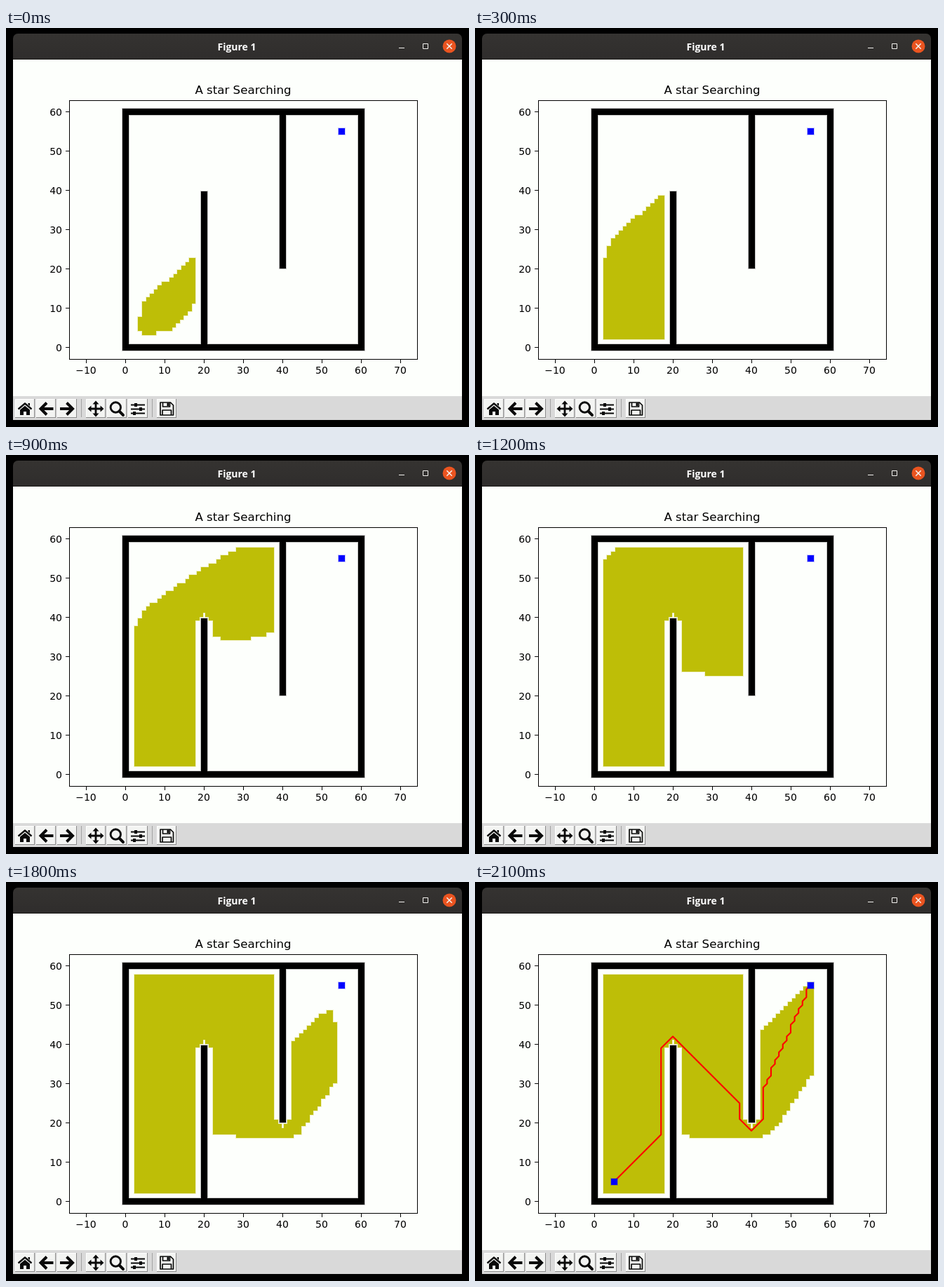
Animation of 660x569 px, one loop 2.4 s. Source, as an HTML page:

```html
<!DOCTYPE html>
<html lang="en">
<head>
<meta charset="utf-8">
<title>A star Searching</title>
<style>
  html, body { margin: 0; width: 100%; height: 100%; overflow: hidden; background: #000; }
  svg { display: block; width: 660px; height: 569px; }
  .plot { font-family: "DejaVu Sans", sans-serif; font-size: 14px; fill: #000; }
  .caption { font: bold 14px "Open Sans", sans-serif; fill: #fff; }
  .crisp { shape-rendering: crispEdges; }
  .cells { stroke-width: 2; stroke-opacity: .22; }
</style>
</head>
<body>
<svg viewBox="0 0 660 569" xmlns="http://www.w3.org/2000/svg">
  <defs>
    <linearGradient id="bar" x2="0" y2="1">
      <stop offset="0" stop-color="#353331"/>
      <stop offset="1" stop-color="#2f2d2c"/>
    </linearGradient>
  </defs>
  <rect width="660" height="569" fill="#000"/>

  <!-- window -->
  <path d="M10 45V15a7 7 0 0 1 7-7H643a7 7 0 0 1 7 7V45z" fill="url(#bar)"/>
  <rect x="10" y="44" width="640" height="1" fill="#191816"/>
  <text class="caption" x="329" y="32" text-anchor="middle">Figure 1</text>
  <g fill="none" stroke="#f4f3f0">
    <path d="M560 28.5h8M594.5 22.5h7v7h-7z"/>
    <circle cx="632" cy="26" r="9.5" fill="#ea5420" stroke="none"/>
    <path d="M628.3 22.3l7.4 7.4m0-7.4l-7.4 7.4" stroke-width="1.5"/>
  </g>
  <rect x="10" y="45" width="640" height="480" fill="#fdfffc"/>
  <rect x="10" y="525" width="640" height="34" fill="#d9d9d9"/>

  <!-- plot -->
  <path id="area" class="cells" fill="#bebe08" stroke="#bebe08"/>
  <path id="walls" class="cells" fill="#000" stroke="#000"/>
  <path id="route" fill="none" stroke="#f00" stroke-width="2.1" stroke-linejoin="round"/>
  <path id="start" class="cells" fill="#00f" stroke="#00f"/>
  <path id="goal" class="cells" fill="#00f" stroke="#00f"/>
  <rect x="90.5" y="103.5" width="496" height="369" fill="none" stroke="#000"/>
  <g id="axes" class="plot">
    <text x="338" y="94" font-size="16.67" text-anchor="middle">A star Searching</text>
  </g>

  <!-- toolbar -->
  <g id="buttons" class="crisp"></g>
  <path class="crisp" d="M107.5 529v26M208.5 529v26" stroke="#a3a3a3"/>
  <g fill="none" stroke="#0a0a0a" stroke-linejoin="round">
    <path d="M17.5 543.5l9.5-8 9.5 8" stroke-width="2.3"/>
    <path d="M20 544.5l7-5.8 7 5.8v7.5h-5v-5h-4v5h-5zM31.5 535h2.5v4l-2.5-2z" fill="#0a0a0a" stroke="none"/>
    <path d="M58 534.5l-8.5 8.5 8.5 8.5M50 543h17.5" stroke-width="4" stroke-linejoin="miter"/>
    <path d="M86.5 534.5l8.5 8.5-8.5 8.5M94.5 543H77" stroke-width="4" stroke-linejoin="miter"/>
    <path d="M128 535v16M120 543h16" stroke-width="2.8"/>
    <path d="M128 531.5l4.5 5h-9zM128 554.5l4.5-5h-9zM116.5 543l5-4.5v9zM139.5 543l-5-4.5v9z" fill="#0a0a0a" stroke="none"/>
    <circle cx="156.3" cy="541" r="7.2" stroke-width="2.9"/>
    <path d="M161.5 546.5l5.5 5.5" stroke-width="4" stroke-linecap="round"/>
    <path d="M178 537.5h20M178 543.5h20M178 549.5h20" stroke-width="1.8"/>
    <path d="M183 535h4v5h-4zM190 541h4v5h-4zM181 547h4v5h-4z" fill="#0a0a0a" stroke="none"/>
    <path d="M220 534h14.5l4 4v14H220zM223.5 534v6h10v-6M223 552v-7h12.5v7" stroke-width="1.7"/>
    <path d="M229.5 534.5h3v4.5h-3z" fill="#0a0a0a" stroke="none"/>
  </g>
</svg>
<script>
const HOLD = 300, CELL = 5.6, SIZE = 9, N = 61, CLEARANCE = 2;
const START = [5, 5], GOAL = [55, 55];
// Rectangles of wall cells: x0, y0, x1, y1
const WALLS = [[0, 0, 60, 0], [0, 60, 60, 60], [0, 0, 0, 60], [60, 0, 60, 60],
  [20, 0, 20, 39], [40, 21, 40, 60]];
// Highest path estimate explored at each stage; the last is the route's own length
const LIMITS = [72.62, 79.7, 82.4, 88.45, 102, 117.12, 118.1, 118.72];

const el = id => document.getElementById(id);
const px = x => 170 + CELL * x;
const py = y => 455.5 - CELL * y;

// Block of square markers spanning grid cells, as a path
function block(x0, y0, x1 = x0, y1 = y0) {
  const l = Math.ceil(px(x0) - SIZE / 2), r = Math.ceil(px(x1) - SIZE / 2) + SIZE;
  const t = Math.ceil(py(y1) - SIZE / 2), b = Math.ceil(py(y0) - SIZE / 2) + SIZE;
  return `M${l} ${t}H${r}V${b}H${l}z`;
}

function isFree(x, y) {
  return WALLS.every(([x0, y0, x1, y1]) =>
    Math.hypot(Math.max(x0 - x, 0, x - x1), Math.max(y0 - y, 0, y - y1)) > CLEARANCE);
}

// Shortest eight-way distance from the start to every free cell
function distances() {
  const free = Array.from({ length: N * N }, (_, i) => isFree(i % N, Math.floor(i / N)));
  const dist = new Array(N * N).fill(Infinity);
  const queue = [START[0] + N * START[1]];
  dist[queue[0]] = 0;
  for (let q = 0; q < queue.length; q++) {
    const i = queue[q];
    for (let dy = -1; dy <= 1; dy++) for (let dx = -1; dx <= 1; dx++) {
      const j = i + dx + N * dy, d = dist[i] + Math.hypot(dx, dy);
      if (free[j] && d < dist[j] - 1e-9) {
        dist[j] = d;
        queue.push(j);
      }
    }
  }
  return dist;
}

// Cells whose travelled plus remaining distance stays within each limit
function searchStages() {
  const cells = distances().map((d, i) => {
    const x = i % N, y = Math.floor(i / N);
    return { x, y, cost: d + Math.hypot(GOAL[0] - x, GOAL[1] - y) };
  });
  return LIMITS.map(limit =>
    cells.filter(c => c.cost <= limit).map(c => block(c.x, c.y)).join(""));
}

function routePath() {
  const pts = [START, [17, 17], [17, 39], [20, 42], [37, 25], [37, 21], [40, 18], [43, 21]];
  for (let y = 29; y <= GOAL[1]; y++) pts.push([43 + Math.floor(0.45 * (y - 29) + 0.72), y]);
  return "M" + pts.map(([x, y]) => px(x).toFixed(1) + " " + py(y).toFixed(1)).join("L");
}

function drawAxes() {
  const label = n => String(n).replace("-", "\u2212");
  let out = "", ticks = "";
  for (let n = -10; n <= 70; n += 10) {
    ticks += `M${Math.round(px(n)) + 0.5} 473v5`;
    out += `<text x="${px(n)}" y="493" text-anchor="middle">${label(n)}</text>`;
    if (n < 0 || n > 60) continue;
    ticks += `M90 ${py(n)}h-5`;
    out += `<text x="80" y="${py(n) + 5}" text-anchor="end">${n}</text>`;
  }
  el("axes").innerHTML += out + `<path d="${ticks}" stroke="#000"/>`;
}

function drawButtons() {
  el("buttons").innerHTML = [13, 43, 73, 114, 144, 174, 215].map(x =>
    `<rect x="${x}" y="529" width="28" height="27" fill="#8b8b8b"/>` +
    `<rect x="${x}" y="529" width="27" height="26" fill="#fff"/>` +
    `<rect x="${x + 1}" y="530" width="26" height="25" fill="#f3f4f2"/>`).join("");
}

drawAxes();
drawButtons();
el("walls").setAttribute("d", WALLS.map(w => block(...w)).join(""));
el("goal").setAttribute("d", block(...GOAL));
el("start").setAttribute("d", block(...START));
el("route").setAttribute("d", routePath());

const stages = searchStages();
const began = performance.now();
let shown = -1;
function tick() {
  const i = Math.floor((performance.now() - began) / HOLD) % stages.length;
  if (i !== shown) {
    shown = i;
    el("area").setAttribute("d", stages[i]);
    const done = i === stages.length - 1 ? "visible" : "hidden";
    el("route").setAttribute("visibility", done);
    el("start").setAttribute("visibility", done);
  }
  requestAnimationFrame(tick);
}
tick();
</script>
</body>
</html>
```
